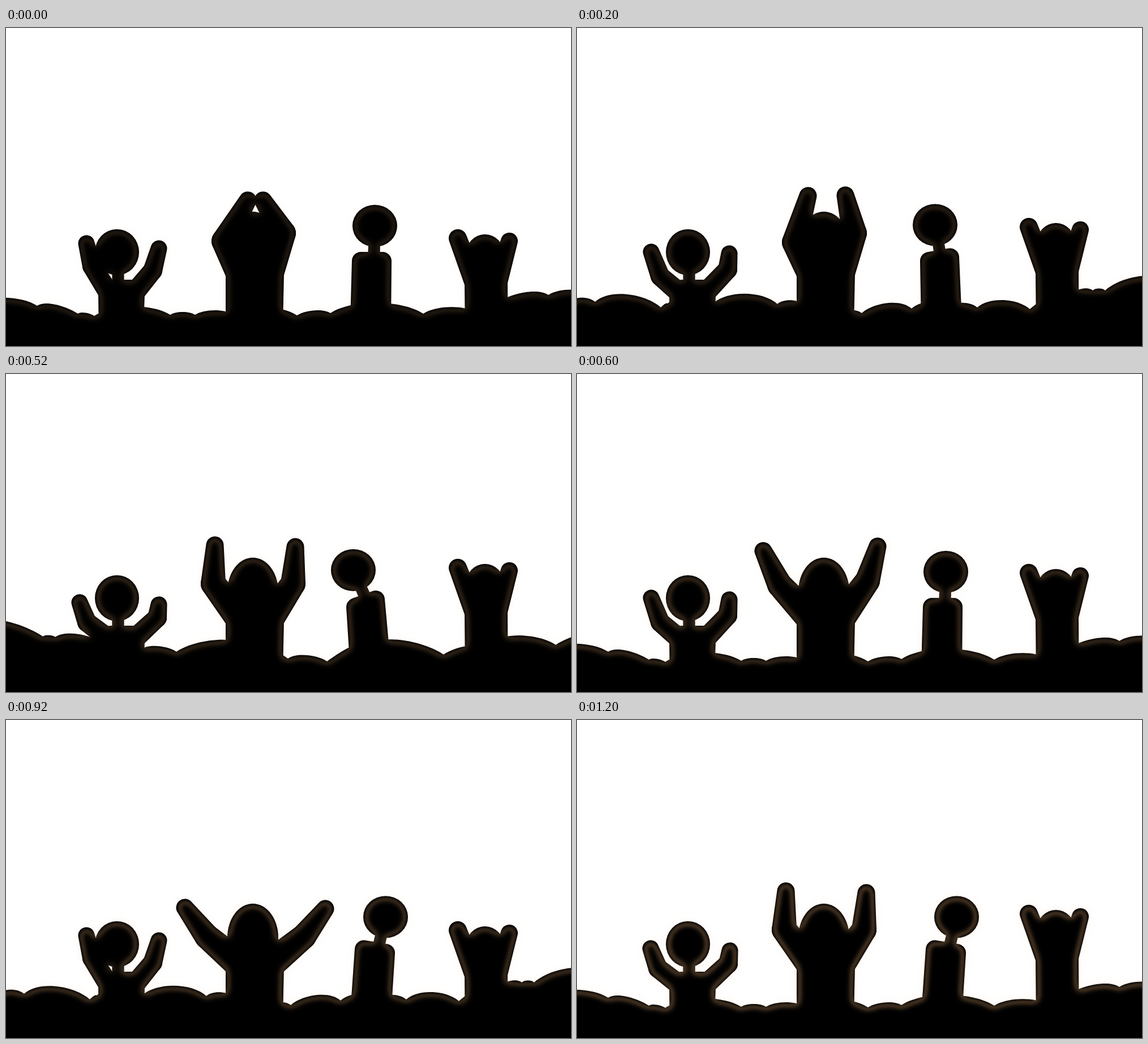
Recreate the animation shown at these times as an HTML page. Size 998x561 px, loop 1400 ms.

```html
<!DOCTYPE html>
<html lang="en">
<head>
<meta charset="utf-8">
<title>Cheering crowd</title>
<style>
html, body { margin: 0; width: 100%; height: 100%; overflow: hidden; background: #fff; }
svg { display: block; width: 100%; height: 100%; }
path { stroke: #000; stroke-linejoin: round; }
</style>
</head>
<body>
<svg viewBox="0 0 998 561">
  <defs>
    <filter id="rim" filterUnits="userSpaceOnUse" x="-80" y="200" width="1160" height="460" color-interpolation-filters="sRGB">
      <feGaussianBlur in="SourceAlpha" stdDeviation="7" result="soft"/>
      <feComponentTransfer in="soft" result="band">
        <feFuncA type="table" tableValues="0 0 0 0 0 .2 .5 .85 1 .7 0"/>
      </feComponentTransfer>
      <feFlood id="inner" flood-color="#4a3724"/>
      <feComposite in2="band" operator="in"/>
      <feComposite in2="SourceAlpha" operator="in" result="glow"/>
      <feFlood id="outer" flood-color="#ffc794"/>
      <feComposite in2="soft" operator="in" result="halo"/>
      <feMerge>
        <feMergeNode in="halo"/>
        <feMergeNode in="SourceGraphic"/>
        <feMergeNode in="glow"/>
      </feMerge>
    </filter>
  </defs>
  <g id="crowd" filter="url(#rim)"></g>
</svg>
<script>
const STEP = 200, STEPS = 7, FLOOR = 620;
const byId = id => document.getElementById(id);

const path = (d, width = 0) => `<path d="${d}" stroke-width="${width}"/>`;
const oval = (x, y, rx, ry) => `<ellipse cx="${x}" cy="${y}" rx="${rx}" ry="${ry}"/>`;
// Polygon grown by r, with round corners.
const body = (points, r) => path(`M${points.join('L')}Z`, 2 * r);

// Tapered capsule around two joints.
function bone(a, ra, b, rb) {
  const dx = b[0] - a[0], dy = b[1] - a[1];
  const dir = Math.atan2(dy, dx), open = Math.acos((ra - rb) / Math.hypot(dx, dy));
  const at = (c, r, t) => [c[0] + r * Math.cos(t), c[1] + r * Math.sin(t)];
  const arc = (r, large, to) => `A${r} ${r} 0 ${+large} 1 ${to}`;
  return path(`M${at(a, ra, dir + open)}${arc(ra, ra > rb, at(a, ra, dir - open))}` +
    `L${at(b, rb, dir - open)}${arc(rb, rb > ra, at(b, rb, dir + open))}Z`);
}

const arm = (shoulder, elbow, hand, [r0, r1, r2]) =>
  bone(shoulder, r0, elbow, r1) + bone(elbow, r1, hand, r2);

// Mounds between neighbouring seams; rise is height per width.
function ground({ rise, seams }) {
  let d = `M${seams[0]}`;
  for (let i = 1; i < seams.length; i++) {
    const [x0, y0] = seams[i - 1], [x1, y1] = seams[i];
    const w = x1 - x0, lift = rise * w * 4 / 3;
    d += `C${x0 + w * .23} ${y0 - lift} ${x1 - w * .23} ${y1 - lift} ${x1} ${y1}`;
  }
  return path(d + `V${FLOOR + 40}H-80Z`);
}

const rows = [
  { rise: .115, seams: [[-45, 485], [55, 490], [127, 504], [156, 508], [290, 506], [334, 506],
    [400, 505], [514, 507], [573, 503], [737, 504], [830, 502], [870, 483], [958, 471], [1045, 472]] },
  { rise: .155, seams: [[-12, 482], [32, 483], [148, 493], [160, 486], [240, 486], [354, 487],
    [400, 488], [470, 503], [503, 503], [591, 495], [660, 491], [707, 493], [800, 496],
    [870, 470], [911, 463], [933, 463], [1050, 450]] },
  { rise: .12, seams: [[-60, 440], [65, 463], [87, 464], [160, 470], [240, 485], [301, 490],
    [430, 480], [498, 502], [567, 507], [640, 478], [773, 495], [840, 484], [860, 472],
    [971, 478], [1060, 462]] }
];

// Arm poses: elbow and hand on the left, then on the right.
const raverPoses = [
  [[152, 420], [142, 380], [259, 428], [270, 389]],
  [[147, 438], [131, 395], [266, 426], [269, 398]],
  [[143, 438], [130, 403], [267, 430], [270, 407]]
];
const waverPoses = [
  [[385, 376], [427, 304], [490, 362], [454, 304]],
  [[384, 378], [408, 296], [490, 362], [474, 295]],
  [[366, 370], [369, 302], [507, 370], [511, 305]],
  [[358, 372], [329, 312], [513, 365], [531, 304]],
  [[355, 382], [316, 331], [526, 382], [564, 333]]
];

function raver([le, lh, re, rh]) {
  const sizes = [18, 17, 14.5];
  return oval(196, 395.5, 39, 40.5) + bone([198, 400], 10.5, [198, 460], 10.5) +
    body([[186, 467], [222, 467], [217, FLOOR], [188, FLOOR]], 23) +
    arm([182, 468], le, lh, sizes) + arm([226, 468], re, rh, sizes);
}

function waver([le, lh, re, rh]) {
  const sizes = [26, 22, 15.5];
  return oval(436, 384, 45, 60) +
    body([[414, 432], [465, 432], [461, FLOOR], [414, FLOOR]], 26) +
    arm([414, 432], le, lh, sizes) + arm([465, 432], re, rh, sizes);
}

// lean runs from -2 (left) to 2 (right); the trailing shoulder lifts.
function nodder(lean) {
  const lift = side => 411 - 6.5 * Math.max(side * lean, 0);
  const head = [651.5 + 19 * lean, 349 - 1.5 * Math.abs(lean)];
  const neck = [650 + 9 * lean, 398 - 2.5 * lean * lean];
  return oval(...head, 39.5, 37) + bone(head, 10, neck, 10.5) +
    body([[627 + 5 * lean, lift(1)], [665 + 6 * lean, lift(-1)], [664, 520], [664, FLOOR],
      [624, FLOOR], [624, 520]], 16);
}

function bobber(dy) {
  const left = [828, 450 + dy], right = [868, 448 + dy];
  return oval(846, 400 + dy, 34, 36) +
    bone([798, 371 + dy], 16, left, 18) + bone([889, 376 + dy], 15, right, 18) +
    body([[810, 385 + dy], [880, 385 + dy], right, left], 0) +
    body([left, right, [869, FLOOR], [830, FLOOR]], 18);
}

// Swings back and forth between 0 and top, one per step.
const swing = (k, top) => top - Math.abs(top - k % (2 * top));

let shown = -1;
function draw(ms) {
  const k = Math.floor(ms / STEP) % STEPS;
  if (k === shown) return;
  shown = k;
  const bounce = swing(k, 2);
  byId('crowd').innerHTML = ground(rows[k % 3]) + raver(raverPoses[bounce]) +
    waver(waverPoses[swing(k, 4)]) + nodder(k < 3 ? -k : swing(k - 3, 2)) +
    bobber([0, -20, -29][bounce]);
  byId('inner').setAttribute('flood-opacity', 0.4 + 0.07 * k);
  byId('outer').setAttribute('flood-opacity', 0.1 + 0.015 * k);
}

const start = performance.now();
function tick() {
  draw(performance.now() - start);
  requestAnimationFrame(tick);
}
tick();
</script>
</body>
</html>
```
